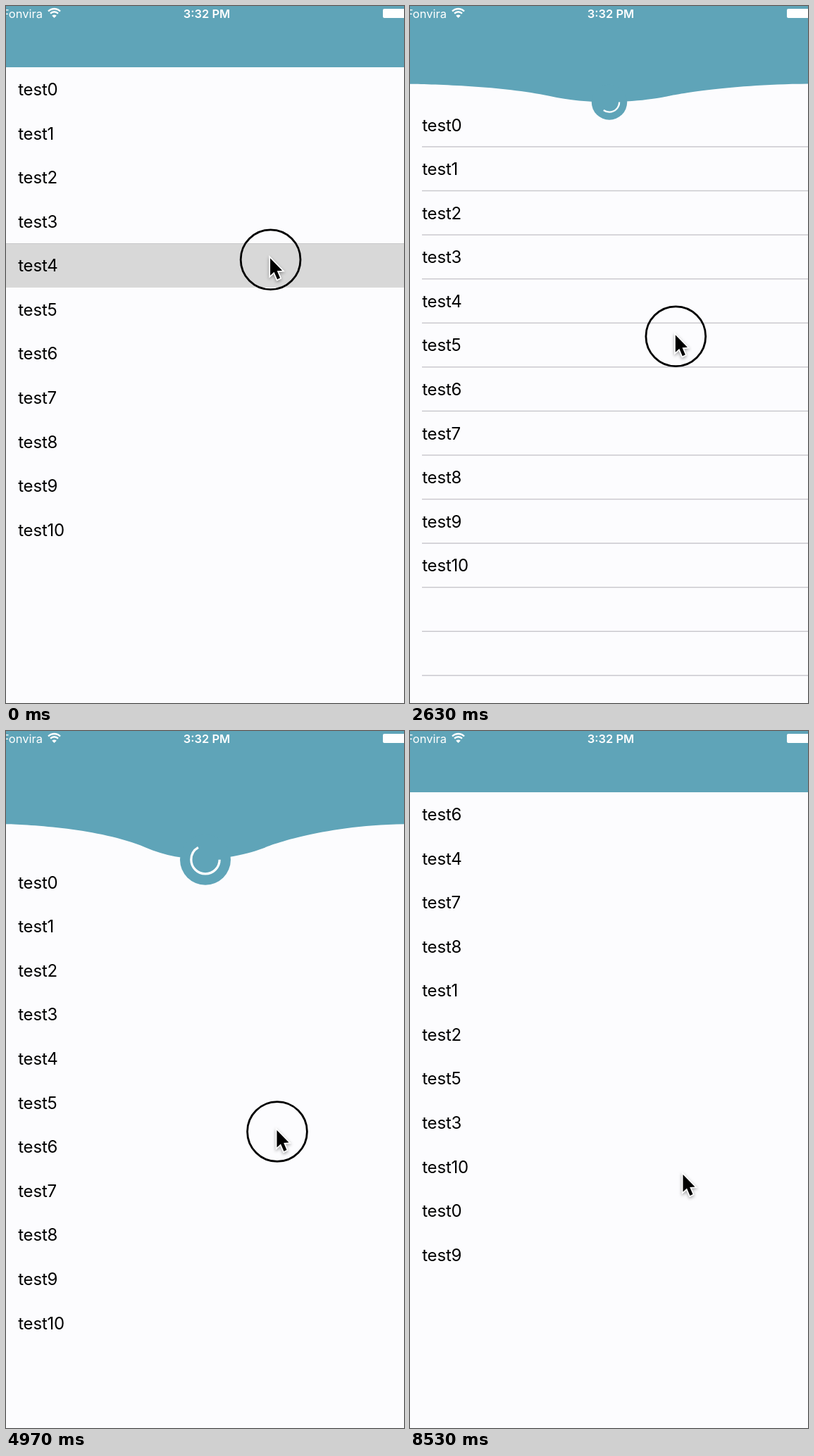
Write an HTML page with a canvas that moves like this. It is 565 px wide and 990 px high and loops after 8.56 s.

```html
<!DOCTYPE html>
<html>
<head>
<meta charset="utf-8">
<style>
html, body { margin: 0; width: 100%; height: 100%; overflow: hidden; background: #fcfcfe; }
canvas { display: block; width: 100vw; height: 100vh; }
</style>
</head>
<body>
<canvas id="stage" width="565" height="990"></canvas>
<script>
const ctx = document.getElementById('stage').getContext('2d');
const W = 565, H = 990, TEAL = '#5fa4b8', PAPER = '#fcfcfe';
const LOOP = 8560, TICK = 100 / 3;          // the screen moves 30 times a second
const HEADER = 87, ROW = 62.58, UNIT = 0.7113;
const MID = 283, HALF = 294.5;              // the phone is wider than the stage
const RELEASE = 162, FALL = 163, SHRINK = 225, GONE = 235, RELOAD = 236;
const MAX_PULL = 177;

// [tick, pull in device pixels]
const PULL = [[0, 0], [9, 34], [26, 98], [38, 107], [49, 102], [60, 104],
  [79, 71], [95, 65], [119, 97], [149, 136], [RELEASE, MAX_PULL]];
// [tick, pointer x]
const POINTER = [[0, 375.6], [49, 377.3], [79, 377.3], [119, 381], [149, 385], [RELEASE, 388]];

const BEFORE = [0, 1, 2, 3, 4, 5, 6, 7, 8, 9, 10];
const AFTER = [6, 4, 7, 8, 1, 2, 5, 3, 10, 0, 9];

// Smooth curve through the points
function follow(keys, t) {
  const last = keys.length - 1;
  if (t >= keys[last][0]) return keys[last][1];
  let i = 0;
  while (keys[i + 1][0] <= t) i++;
  const slope = j => {
    const a = keys[Math.max(0, j - 1)], b = keys[Math.min(last, j + 1)];
    return (b[1] - a[1]) / (b[0] - a[0]);
  };
  const [t0, v0] = keys[i], [t1, v1] = keys[i + 1];
  const span = t1 - t0, p = (t - t0) / span, q = 1 - p;
  return v0 * (1 + 2 * p) * q * q + v1 * p * p * (3 - 2 * p)
    + span * p * q * (slope(i) * q - slope(i + 1) * p);
}

function pullAt(tick) {
  if (tick <= RELEASE) return Math.max(0, Math.round(follow(PULL, tick)));
  const s = (tick - RELEASE) / 30 * 11;
  return Math.round(MAX_PULL * Math.exp(-s) * (1 + s));
}

function label(text, x, y, font, align, color) {
  ctx.font = font + ' Inter, Roboto, sans-serif';
  ctx.textAlign = align;
  ctx.fillStyle = color;
  ctx.fillText(text, x, y);
}

function disc(x, y, r, color) {
  ctx.fillStyle = color;
  ctx.beginPath();
  ctx.arc(x, y, r, 0, 7);
  ctx.fill();
}

function arc(x, y, r, from, to, width, color) {
  ctx.strokeStyle = color;
  ctx.lineWidth = width;
  ctx.beginPath();
  ctx.arc(x, y, r, from * Math.PI / 180, to * Math.PI / 180);
  ctx.stroke();
}

// Elastic edge: two flat shoulders and a sagging middle
function drawHeader(d) {
  const wave = d * 1.6 / 3, base = HEADER + d - wave;
  const x = k => MID + k * HALF, shoulder = base + 0.64 * wave;
  ctx.fillStyle = TEAL;
  ctx.beginPath();
  ctx.moveTo(x(-1), 0);
  ctx.lineTo(x(-1), base);
  ctx.bezierCurveTo(x(-1), base, x(-0.56), base, x(-0.29), shoulder);
  ctx.bezierCurveTo(MID, base + 1.36 * wave, x(0.29), shoulder, x(0.29), shoulder);
  ctx.bezierCurveTo(x(0.29), shoulder, x(0.56), base, x(1), base);
  ctx.lineTo(x(1), 0);
  ctx.fill();
}

function drawStatus() {
  ctx.letterSpacing = '0px';
  label('Fonvira', 52, 17, '16.5px', 'right', '#fff');
  label('3:32 PM', 285, 17, '600 16.5px', 'center', '#fff');
  for (const r of [12, 7.7]) arc(68.5, 16, r, -135, -45, 2.4, '#fff');
  ctx.fillStyle = '#fff';
  ctx.beginPath();
  ctx.moveTo(68.5, 17);
  ctx.arc(68.5, 17, 4.6, -Math.PI * 0.75, -Math.PI * 0.25);
  ctx.fill();
  ctx.beginPath();
  ctx.roundRect(535, 4, 40, 13, 2);
  ctx.fill();
}

function drawList(tick, pull) {
  const top = HEADER + pull * UNIT;
  if (tick < 2) {
    ctx.fillStyle = '#d8d8d8';
    ctx.fillRect(0, top + 4 * ROW, W, ROW);
    ctx.fillStyle = '#c8c8ca';
    ctx.fillRect(0, 337, W, 1);
  }
  // Hairlines only survive on odd device pixels
  if (pull % 2) {
    ctx.fillStyle = '#c8c7cc';
    for (let y = top + ROW; y < H; y += ROW) ctx.fillRect(17, y - 0.9, W, 1.42);
  }
  ctx.letterSpacing = '-0.2px';
  (tick < RELOAD ? BEFORE : AFTER).forEach((n, i) =>
    label('test' + n, 17.2, top + i * ROW + 40, '24px', 'left', '#000'));
}

function drawBall(tick, d) {
  if (tick >= GONE) return;
  let r = Math.min(36, d / 2), y = HEADER - 1 + d, from = 0;
  let sweep = Math.min(288, 2.48 * d);
  if (tick > RELEASE) {
    const s = Math.max(0, (tick - FALL) / 30);
    const start = HEADER + MAX_PULL * UNIT;
    y = 860 - (860 - start) * Math.exp(-5.6 * s) * Math.cos(Math.PI * s / 0.7);
    r = 36 * Math.min(1, (GONE - tick) / (GONE - SHRINK));
    from = (tick - RELEASE) * 15.07;
    sweep = 288;
  }
  if (r < 0.5) return;
  disc(MID, y, r, TEAL);
  arc(MID, y, r * 0.56, from, from + sweep, r * 0.09, '#fff');
}

function drawPointer(tick) {
  const t = Math.min(tick, RELEASE);
  const x = follow(POINTER, t), y = 360.3 + pullAt(t) * UNIT / 0.4635;
  if (tick < RELEASE) arc(x, y, 42.4, 0, 360, 2.8, '#000');
  ctx.save();
  ctx.translate(x - 0.5, y - 2);
  ctx.beginPath();
  ctx.moveTo(0, 0);
  for (const [px, py] of [[0, 24.5], [5.5, 19.5], [10, 30], [14, 28], [9.7, 18], [17, 17.5]])
    ctx.lineTo(px, py);
  ctx.closePath();
  ctx.shadowColor = 'rgba(0,0,0,.35)';
  ctx.shadowBlur = 4;
  ctx.shadowOffsetY = 2;
  ctx.strokeStyle = '#fff';
  ctx.lineWidth = 3.5;
  ctx.stroke();
  ctx.shadowColor = 'transparent';
  ctx.fillStyle = '#000';
  ctx.fill();
  ctx.restore();
}

function draw(now) {
  const tick = Math.floor((now % LOOP + 3.4) / TICK);
  const pull = pullAt(tick), d = pull * UNIT;
  ctx.fillStyle = PAPER;
  ctx.fillRect(0, 0, W, H);
  drawList(tick, pull);
  drawHeader(d);
  drawStatus();
  drawBall(tick, d);
  drawPointer(tick);
}

let begin;
function loop(now) {
  begin ??= now;
  draw(now - begin);
  requestAnimationFrame(loop);
}
requestAnimationFrame(loop);
</script>
</body>
</html>
```
